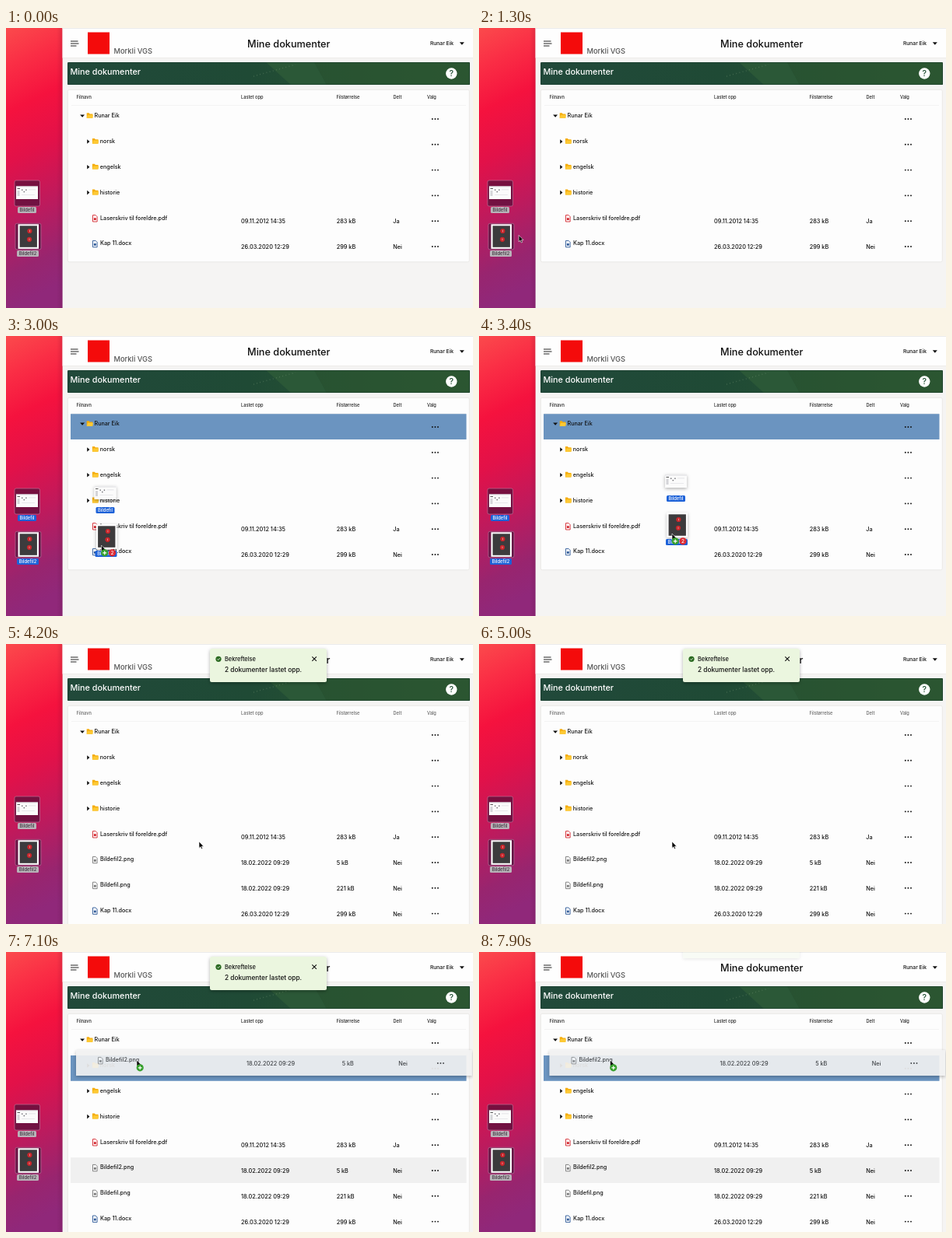
Animation, 600 px wide and 360 px high, one loop 8 s. Source, as an HTML page:

```html
<!DOCTYPE html>
<html lang="no">
<head>
<meta charset="utf-8">
<title>Mine dokumenter</title>
<style>
html, body { margin: 0; width: 600px; height: 360px; overflow: hidden; background: #f6f5f4; }
svg { display: block; }
text { font-family: Inter, "Open Sans", Arial, sans-serif; font-weight: 500; white-space: pre; }
</style>
</head>
<body>
<svg id="stage" width="600" height="360" viewBox="0 0 600 360">
  <defs>
    <linearGradient id="wall" x1="0" y1="0" x2="0.1" y2="1">
      <stop offset="0" stop-color="#fb4a4c"/>
      <stop offset=".14" stop-color="#fa2e45"/>
      <stop offset=".3" stop-color="#f5123e"/>
      <stop offset=".48" stop-color="#e21149"/>
      <stop offset=".68" stop-color="#bf1a5c"/>
      <stop offset=".88" stop-color="#98256f"/>
      <stop offset="1" stop-color="#90287a"/>
    </linearGradient>
    <linearGradient id="edge">
      <stop offset="0" stop-color="#400020" stop-opacity="0"/>
      <stop offset="1" stop-color="#400020" stop-opacity=".14"/>
    </linearGradient>
    <linearGradient id="board">
      <stop offset="0" stop-color="#21493a"/>
      <stop offset=".45" stop-color="#1f4a35"/>
      <stop offset="1" stop-color="#305a33"/>
    </linearGradient>
    <clipPath id="boardClip"><rect x="79" y="44" width="517" height="29" rx="1.5"/></clipPath>
    <filter id="shadow" x="-20%" y="-30%" width="140%" height="170%">
      <feDropShadow dx="0" dy="1.5" stdDeviation="2" flood-opacity=".3"/>
    </filter>
  </defs>
</svg>
<script>
const LOOP = 8000, ROW = 32.8, TOP = 100.2;
const BLUE = '#1c61d8', DROP = '#6b94c0';
const stage = document.getElementById('stage');

function add(parent, tag, attrs = {}) {
  const el = document.createElementNS('http://www.w3.org/2000/svg', tag);
  for (const k in attrs) el.setAttribute(k, attrs[k]);
  return parent.appendChild(el);
}
const group = (p, attrs) => add(p, 'g', attrs);
const rect = (p, x, y, width, height, fill, more) => add(p, 'rect', { x, y, width, height, fill, ...more });
const circle = (p, cx, cy, r, fill) => add(p, 'circle', { cx, cy, r, fill });
const path = (p, d, more) => add(p, 'path', { d, fill: 'none', ...more });
// y is the middle of the capitals
function text(p, x, y, str, size, more) {
  const el = add(p, 'text', { x, y: y + size * 0.36, 'font-size': size, fill: '#111', ...more });
  el.textContent = str;
  return el;
}
const show = (el, on) => el.setAttribute('visibility', on ? 'visible' : 'hidden');
const move = (el, x, y) => el.setAttribute('transform', `translate(${x} ${y})`);

// Desktop
rect(stage, 0, 0, 73, 360, 'url(#wall)');
rect(stage, 65, 0, 8, 360, 'url(#edge)');

function listThumb(p) {
  rect(p, 13, 203.5, 28, 16.5, '#fbfbfb');
  rect(p, 13, 203.5, 28, 1, '#dcdce0');
  rect(p, 14.5, 206, 3.5, 1, '#555');
  rect(p, 14.5, 209, 3, 7, '#d4d4d8');
  for (let i = 0; i < 3; i++) rect(p, 20 + i * 2.6, 207.5 + (i % 2) * 2.4, 1.4, 1.4, '#66666c');
  rect(p, 29, 207.5, 9, 0.8, '#dedee2');
  rect(p, 20, 214, 17, 0.8, '#e4e4e8');
}
function darkThumb(p) {
  rect(p, 15.5, 252.3, 26.5, 31.5, '#fff');
  rect(p, 17.6, 254.3, 22.3, 27.5, '#3c3b3d');
  for (const [x, y] of [[30.4, 261], [30, 271.8]]) {
    circle(p, x, y, 3.1, '#c9252b');
    rect(p, x - 0.4, y - 1.3, 0.8, 2.6, '#eba5a5');
  }
}
function label(p, x, y, w, str) {
  const box = rect(p, x - w / 2, y - 3.9, w, 7.8, BLUE, { rx: 1.5 });
  const name = text(p, x, y, str, 5.8, { fill: '#fff', 'font-weight': 600, 'text-anchor': 'middle' });
  return { box, name };
}
const files = [
  { x: 11, y: 196, w: 32.5, h: 33, thumb: listThumb, label: [27, 234, 24, 'Bildefil'] },
  { x: 12, y: 251.3, w: 33, h: 33.5, thumb: darkThumb, label: [28, 290, 28, 'Bildefil2'] }
];
for (const f of files) {
  f.frame = rect(stage, f.x, f.y, f.w, f.h, 'rgba(60,12,50,.6)', { rx: 2, stroke: 'rgba(190,140,170,.65)', 'stroke-width': 0.8 });
  f.thumb(stage);
}
const marquee = rect(stage, 0, 0, 0, 0, 'rgba(205,195,205,.27)', { stroke: 'rgba(225,215,225,.6)', 'stroke-width': 0.7 });
for (const f of files) f.tag = label(stage, ...f.label);

function mark(f, state) {
  show(f.frame, state !== 'none');
  f.tag.box.setAttribute('fill', { none: 'none', idle: '#b9b3b9', on: BLUE }[state]);
  f.tag.name.setAttribute('fill', state === 'idle' ? '#3d353d' : '#fff');
}

// Page header
rect(stage, 72.6, 0, 527.4, 360, '#f5f4f3');
rect(stage, 72.6, 0, 527.4, 38.5, '#fefefe');
rect(stage, 72.6, 0, 527.4, 1, '#ebebeb');
rect(stage, 73, 38.2, 527, 0.6, '#e6e4e2');
path(stage, 'M83 17H92.5M83 20H93.5M83 23H90.5', { stroke: '#222', 'stroke-width': 1.1 });
rect(stage, 105, 5.5, 28, 28, '#f40b0b');
text(stage, 138.5, 29.8, 'Morkli VGS', 9.3, { fill: '#555', 'font-weight': 400 });
text(stage, 363.3, 20, 'Mine dokumenter', 12.7, { 'font-weight': 700, 'text-anchor': 'middle' });
text(stage, 575, 20, 'Runar Eik', 6.7, { 'font-weight': 600, 'text-anchor': 'end' });
path(stage, 'M582.8 18.3H588.8L585.8 21.8Z', { fill: '#111' });

// Green banner
const banner = group(stage, { 'clip-path': 'url(#boardClip)' });
rect(banner, 79, 44, 517, 29, 'url(#board)');
path(banner, 'M334 44H396L412 73H366Z', { fill: '#2b5837' });
path(banner, 'M396 44H596V73H412Z', { fill: '#2a5431', opacity: 0.7 });
path(banner, 'M318 62L372 47', { stroke: '#7d9d7b', 'stroke-width': 1.4, 'stroke-dasharray': '.7 3.6', opacity: 0.5 });
rect(banner, 79, 44, 517, 29, 'none', { rx: 1.5, stroke: '#17382a', 'stroke-width': 1.2 });
text(banner, 82.5, 55.8, 'Mine dokumenter', 10.8, { fill: '#fff', 'font-weight': 700 });
circle(banner, 572.3, 58.5, 7.2, '#fff');
text(banner, 572.3, 58.7, '?', 10.5, { fill: '#1e4d31', 'font-weight': 700, 'text-anchor': 'middle' });

// Table
const card = rect(stage, 79.3, 79.3, 516, 221.5, '#fdfdfd', { rx: 2, stroke: '#e4e2e0', 'stroke-width': 0.7 });
const heads = group(stage);
[[90.5, 'Filnavn'], [302, 'Lastet opp'], [424.5, 'Filstørrelse'], [497.5, 'Delt'], [541, 'Valg']]
  .forEach(([x, s]) => text(heads, x, 89, s, 5.65, { fill: 'inherit' }));
rect(stage, 84, 99.3, 507, 0.5, '#ebebeb');
const bar = rect(stage, 83, 0, 508.5, ROW, DROP);
const hover = rect(stage, 83, TOP + 5 * ROW, 508.5, ROW, '#f0f0f0');

function dots(p) {
  for (let i = 0; i < 3; i++) circle(p, 547.8 + i * 3.6, 16.8, 0.95, '#111');
}
function folder(p, x, name, open) {
  path(p, open ? `M${x - 8.9} 11.3h6l-3 3.3Z` : `M${x - 7} 10.2v5.6l3.2-2.8Z`, { fill: '#111' });
  path(p, `M${x - 0.3} 9h3l1 1.2h3.6v5.6h-7.6Z`, { fill: '#f5ad0c' });
  path(p, `M${x + 0.9} 11.6h7.1l-1 4.2h-7.3Z`, { fill: '#fdc935' });
  text(p, x + 9.6, 12.6, name, 7.15);
  dots(p);
}
function file(p, tint, name, date, size, shared) {
  path(p, 'M111.5 9.2h3.6l2 2v6.4h-5.6Z', { fill: '#fff', stroke: tint, 'stroke-width': 0.9 });
  rect(p, 112.9, 12.8, 2.8, 2.8, tint);
  text(p, 121, 12.6, name, 7.2);
  text(p, 302, 17.3, date, 7.35);
  text(p, 424.7, 17.3, size, 7.3);
  text(p, 497.3, 17.3, shared, 7.3);
  dots(p);
}
function row(i, draw, ...args) {
  const g = group(stage);
  draw(g, ...args);
  move(g, 0, TOP + i * ROW);
  return g;
}
const image2 = ['#777', 'Bildefil2.png', '18.02.2022 09:29', '5 kB', 'Nei'];
row(0, folder, 104, 'Runar Eik', true);
['norsk', 'engelsk', 'historie'].forEach((s, i) => row(i + 1, folder, 111.2, s, false));
row(4, file, '#d3222a', 'Laserskriv til foreldre.pdf', '09.11.2012 14:35', '283 kB', 'Ja');
const fresh = [
  row(5, file, ...image2),
  row(6, file, '#777', 'Bildefil.png', '18.02.2022 09:29', '221 kB', 'Nei')
];
const last = row(5, file, '#2b5797', 'Kap 11.docx', '26.03.2020 12:29', '299 kB', 'Nei');

// Confirmation
const toast = group(stage);
rect(toast, 262, 6, 150, 43, '#ebf6df', { rx: 2.5, filter: 'url(#shadow)' });
circle(toast, 273, 19.3, 3.6, '#2c6b22');
path(toast, 'M271.4 19.4l1.2 1.2 2.1-2.4', { stroke: '#fff', 'stroke-width': 0.8 });
text(toast, 281, 19.2, 'Bekreftelse', 7.4);
text(toast, 281, 33, '2 dokumenter lastet opp.', 8.3, { 'font-weight': 600 });
path(toast, 'M393.3 16.3l5.6 5.6m0-5.6l-5.6 5.6', { stroke: '#111', 'stroke-width': 1.1 });

// Things carried by the pointer
const carried = group(stage);
for (const f of files) {
  f.thumb(group(carried, { filter: 'url(#shadow)' }));
  label(carried, ...f.label);
}
const ghost = group(stage, { opacity: 0.91 });
rect(ghost, 83, 0, 508.5, ROW, '#f2f2f2', { filter: 'url(#shadow)' });
file(group(ghost, { opacity: 0.8 }), ...image2);

const pointer = group(stage);
path(pointer, 'M0 0V8.4L1.9 6.7 3.2 9.6 4.6 9 3.3 6.2H5.9Z', { fill: '#000', stroke: '#fff', 'stroke-width': 0.6 });
const plus = group(pointer);
circle(plus, 4.2, 9.8, 4.6, '#36a02c');
path(plus, 'M1.8 9.8h4.8M4.2 7.4v4.8', { stroke: '#fff', 'stroke-width': 1.2 });
const count = group(pointer);
circle(count, 14, 9.8, 4.6, '#dc2a33');
text(count, 14, 9.8, '2', 6.5, { fill: '#fff', 'font-weight': 600, 'text-anchor': 'middle' });

// Motion: [time, x, y]
const PATH = [
  [1000, 46, 364], [1550, 55, 193], [1700, 55, 193], [2200, 22, 288], [2450, 22, 288],
  [2600, 22, 281], [2700, 22, 281], [3350, 248, 254], [5200, 248, 254], [6200, 161, 277],
  [6500, 161, 277], [7050, 168, 139], [7300, 168, 139], [7800, 168.5, 139]
];
const HIDDEN = -56;
const TOAST = [[3900, 0, HIDDEN], [4200, 0, 0], [7600, 0, 0], [7900, 0, -41], [8000, 0, HIDDEN]];
const ease = u => u * u * (3 - 2 * u);

function at(track, t) {
  if (t <= track[0][0]) return track[0].slice(1);
  for (let i = 1; i < track.length; i++) {
    const [t0, x0, y0] = track[i - 1], [t1, x1, y1] = track[i];
    if (t < t1) {
      const u = ease((t - t0) / (t1 - t0));
      return [x0 + (x1 - x0) * u, y0 + (y1 - y0) * u];
    }
  }
  return track[track.length - 1].slice(1);
}

function draw(t) {
  const [x, y] = at(PATH, t);
  const within = (a, b) => t >= a && t < b;
  const selecting = within(1700, 2400), carrying = within(2700, 3600);
  const dragging = t >= 6500, uploaded = t >= 3850;

  show(pointer, t >= 1000);
  move(pointer, x, y);

  show(marquee, selecting);
  const box = { x, y: 193, width: Math.max(0, 55 - x), height: Math.max(0, y - 193) };
  for (const k in box) marquee.setAttribute(k, box[k]);
  for (const f of files) {
    const hit = x < f.x + f.w && y > f.y;
    mark(f, selecting ? (hit ? 'on' : 'none') : within(2400, 3650) ? 'on' : 'idle');
  }

  show(carried, carrying);
  move(carried, x - 22, y - 281 + 2);
  show(count, carrying);
  const overTable = carrying && x > 83;
  show(plus, overTable || dragging && y < 264);

  const target = Math.floor((y - TOP) / ROW);
  const overFolder = dragging && target < 4;
  show(bar, overTable || overFolder);
  bar.setAttribute('y', TOP + (overFolder ? target : 0) * ROW);

  card.setAttribute('height', 221.5 + (uploaded ? 2 * ROW : 0));
  fresh.forEach(r => show(r, uploaded));
  move(last, 0, TOP + (uploaded ? 7 : 5) * ROW);
  heads.setAttribute('fill', within(3850, 6500) ? '#666' : '#222');
  show(hover, uploaded && (y > TOP + 5 * ROW || dragging));

  show(ghost, dragging);
  move(ghost, x - 161, TOP + 5 * ROW + y - 277);

  const [, slide] = at(TOAST, t);
  show(toast, t >= 3900);
  move(toast, 0, slide);
  toast.setAttribute('opacity', 1 - slide / HIDDEN);
}

function tick() {
  draw(performance.now() % LOOP);
  requestAnimationFrame(tick);
}
tick();
</script>
</body>
</html>
```
